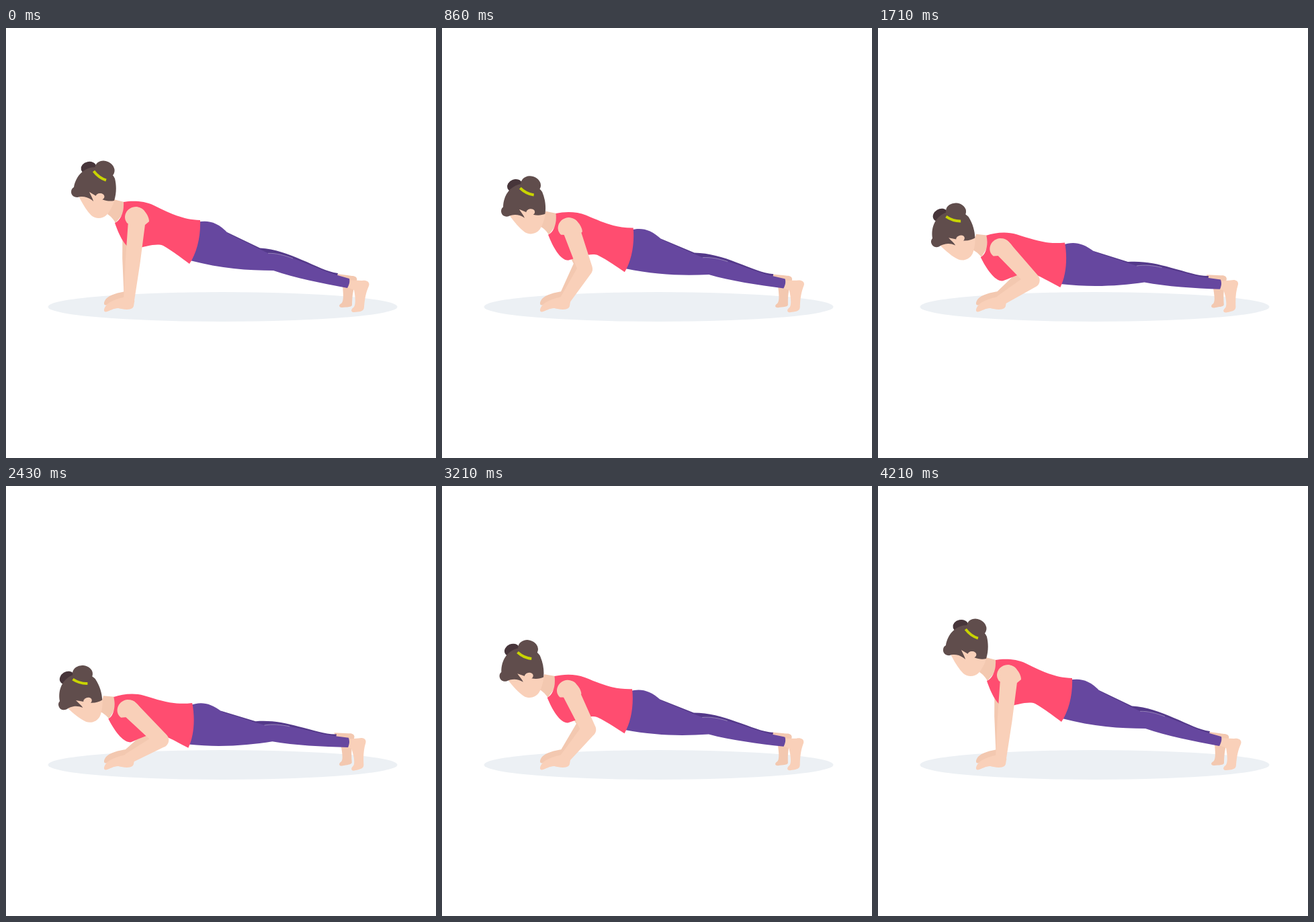
An HTML page that plays this animation: 640x640 px, repeating every 4.43 s.

```html
<!DOCTYPE html>
<html lang="en">
<head>
<meta charset="utf-8">
<title>Push-up</title>
<style>
  html, body { margin: 0; height: 100%; overflow: hidden; background: #fff; }
  svg { display: block; width: 100vw; height: 100vh; }
  .skin { fill: #f9d0b9; }
  .shade { fill: #f3c8b0; }
  .hair { fill: #604d4c; }
</style>
</head>
<body>
<svg viewBox="0 0 640 640">
  <ellipse cx="322.5" cy="415" rx="260" ry="22" fill="#ecf0f4"/>

  <path id="backFoot" class="shade" d="M493 366L515 369C522 369 524 374 521 378C517 386 515 400 515 412C515 416 508 415 500 416C495 416 495 412 499 410C503 407 502 395 501 384L495 374Z"/>
  <path id="frontFoot" class="skin" d="M508 375L530 376C538 375 542 379 540 384C536 393 534 402 533 415C533 423 525 422 518 423C513 423 513 419 517 416C521 413 520 400 518 390L506 385Z"/>

  <path class="shade" d="M180 392C168 393 153 398 149 403C145 408 145 413 149 412.5C155 411 160 407 167 407C172 408 180 408 186 404Z"/>
  <path id="backArm" class="shade"/>

  <g id="body">
    <path fill="#54398a" d="M329 304L378 327.5C400 329 420 336 440 345C462 354 478 363 494 365L492 372L400 352L330 316Z"/>
    <path fill="#66479f" d="M285 289C300 286 314 288 331 306C346 314 362 321 378 329.5L390 335C402 335 414 338 426 342.5C448 350 470 361 490 367L511 373C512 378 511 382 508 387C470 380 430 372 398 361C360 361 320 358 274 346Z"/>
    <path fill="none" stroke="#a99bc4" stroke-width=".7" d="M390 335.3C402 335 414 338 427 343"/>
    <path class="shade" d="M160 255L176 259L174 277L163 290C160 285 157 281 151 277Z"/>
    <path fill="#ff4d70" d="M175 259C188 257 205 257 220 264C245 276 262 285 289 286C290 310 284 335 273 351C258 340 245 330 234 324C225 320 208 325 190 329.5C178 329 168 308 162 290C170 287 176 275 175 259Z"/>
    <path class="skin" d="M181 291C172 282 179 266 194 266C205 267 213 280 213 288L207 293Z"/>
    <g id="head">
      <ellipse cx="123" cy="208" rx="11.5" ry="9" fill="#47353a" transform="rotate(-12 123 208)"/>
      <path class="skin" d="M108 250C114 262 120 272 127 279C134 285 144 284 150 278C156 271 160 262 162 255L140 235L112 240Z"/>
      <path class="hair" d="M97 244C97 240 99 238 101 237C104 220 116 207 134 207C148 208 158 215 162 224C165 236 164 248 161 257C156 258 150 258 143 255L134 250L124 244C126 249 129 253 130 258C122 250 112 250 106 252C100 252 97 248 97 244Z"/>
      <ellipse class="skin" cx="140" cy="251" rx="6.5" ry="5"/>
      <ellipse class="hair" cx="147" cy="210.3" rx="15" ry="12.3" transform="rotate(25 147 210.3)"/>
      <path fill="none" stroke="#c8d400" stroke-width="4" d="M130.500 213Q138 223 149 226.500"/>
    </g>
  </g>

  <path id="frontArm" class="skin"/>
  <path class="skin" d="M178 400C168 402 153 407 149 413C145 418 145 423 149 422.500C155 421 160 417 167 417C174 419 184 420 188 417C191 415 190 410 191.500 406Z"/>
</svg>
<script>
const LOOP = 4430, STEP = 71.4;
const PIVOT = [511, 380];
const el = id => document.getElementById(id);
const turn = (id, deg, [x, y], drop = 0) =>
  el(id).setAttribute('transform', `translate(0 ${drop}) rotate(${-deg} ${x} ${y})`);

// Accelerates, then keeps a constant speed.
function ease(u) {
  const a = 0.4, speed = 1 / (1 - a / 2);
  u = Math.max(0, u);
  return u < a ? speed * u * u / (2 * a) : speed * (u - a / 2);
}

// 0 = arms straight, 1 = lowest point
function depth(k) {
  if (k < 28) return ease(k / 28);
  if (k <= 32) return 1;
  return ease((59.2 - k) / 27.2);
}

// Counter-clockwise turn about the ankle.
function swing([x, y], deg, drop) {
  const r = deg * Math.PI / 180, c = Math.cos(r), s = Math.sin(r);
  const dx = x - PIVOT[0], dy = y - PIVOT[1];
  return [PIVOT[0] + dx * c + dy * s, PIVOT[1] - dx * s + dy * c + drop];
}

// Elbow of a two-bone arm, bending to the right.
function elbow([sx, sy], [wx, wy], upper, fore) {
  const dx = wx - sx, dy = wy - sy, d = Math.hypot(dx, dy);
  const straight = d >= upper + fore;
  const a = straight ? d * upper / (upper + fore)
                     : (upper * upper - fore * fore + d * d) / (2 * d);
  const h = straight ? 0 : Math.sqrt(upper * upper - a * a);
  return [sx + (dx * a + dy * h) / d, sy + (dy * a - dx * h) / d];
}

// Tapered segment with round ends.
function segment([ax, ay], ra, [bx, by], rb) {
  const d = Math.hypot(bx - ax, by - ay);
  const nx = (ay - by) / d, ny = (bx - ax) / d;
  return `M${ax + nx * ra} ${ay + ny * ra}L${bx + nx * rb} ${by + ny * rb}` +
    `A${rb} ${rb} 0 0 0 ${bx - nx * rb} ${by - ny * rb}` +
    `L${ax - nx * ra} ${ay - ny * ra}A${ra} ${ra} 0 0 0 ${ax + nx * ra} ${ay + ny * ra}Z`;
}

function arm(id, shoulder, wrist, upper, fore, [r1, r2, r3]) {
  const joint = elbow(shoulder, wrist, upper, fore);
  el(id).setAttribute('d', segment(shoulder, r1, joint, r2) + segment(joint, r2, wrist, r3));
}

function draw(now) {
  const p = depth(Math.floor((now % LOOP + 4) / STEP));
  const lean = 9.8 * p, drop = 1.7 * p;
  turn('body', lean, PIVOT, drop);
  turn('head', 11.8 * Math.sqrt(p), [178, 277]); // the head leads the body
  turn('backFoot', 6 * p, [505, 414]);
  turn('frontFoot', 8 * p, [523, 420]);
  const [x, y] = swing([195.5, 280], lean, drop);
  arm('frontArm', [x, y], [183, 405], 66.5, 55.2, [13, 11, 8]);
  arm('backArm', [x - 12, y], [182, 397], 61, 52.5, [10, 9.5, 6.5]);
  requestAnimationFrame(draw);
}
requestAnimationFrame(draw);
</script>
</body>
</html>
```
